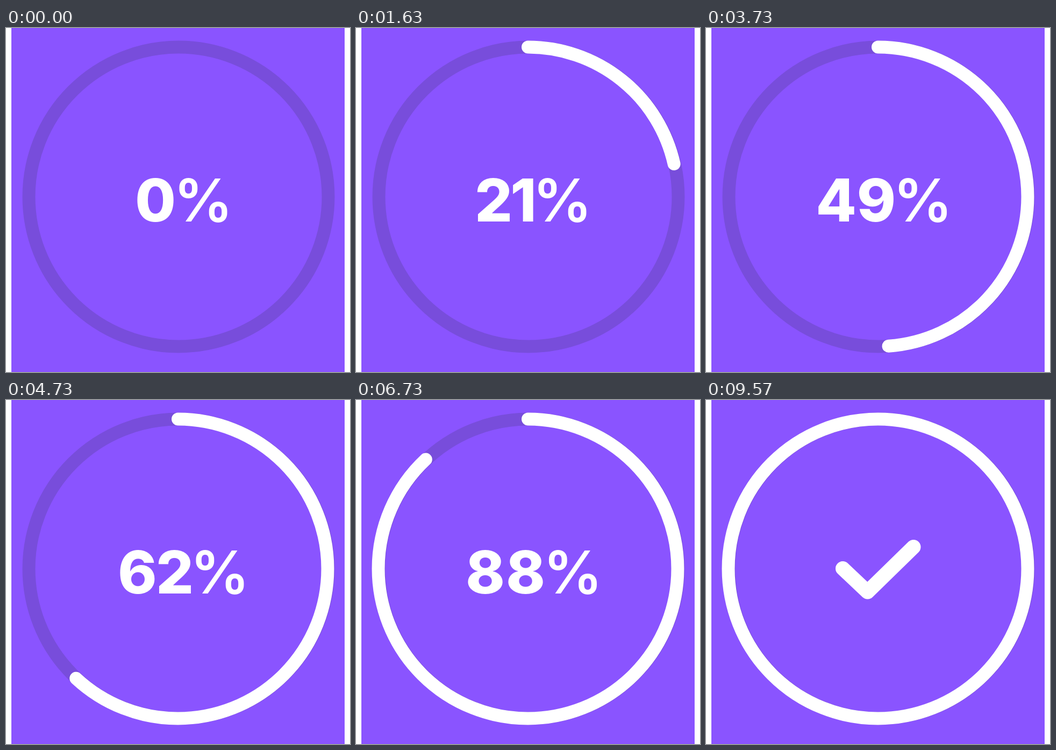
These frames come from a looping animation (640x640 px, 9610 ms). An HTML page:

```html
<!DOCTYPE html>
<html lang="en">
<head>
<meta charset="utf-8">
<title>Progress ring</title>
<style>
  html, body { margin: 0; width: 100%; height: 100%; overflow: hidden; background: #fff; }
  svg { display: block; width: 100%; height: 100%; }
  text {
    font: 800 110px Inter, "Open Sans", sans-serif;
    font-feature-settings: "cv09";
    text-anchor: middle;
    fill: #fff;
  }
  .sign { font-weight: 600; }
  .line { fill: none; stroke: #fff; stroke-linecap: round; stroke-linejoin: round; }
</style>
</head>
<body>
<svg viewBox="0 0 640 640">
  <rect x="10" width="620" height="640" fill="#8a54ff"/>
  <circle cx="321" cy="314" r="278.5" fill="none" stroke="#784ddb" stroke-width="24"/>
  <circle id="ring" class="line" cx="320" cy="314" r="278.5" stroke-width="24" transform="rotate(-90 320 314)"/>
  <g id="label">
    <text y="360"></text><text y="360"></text><text y="360"></text>
    <text y="360" class="sign">%</text>
  </g>
  <path id="check" class="line" d="M254.5 313.5L300.5 357L386 273.5" stroke-width="27"/>
</svg>
<script>
const LOOP = 9610, STEP = 40;
const LENGTH = 2 * Math.PI * 278.5;
const ADVANCE = [77, 44, 67, 67, 78, 67, 72, 70, 75, 72];
const SIGN_ADVANCE = 98, CENTER = 327;

const ring = document.getElementById('ring');
const label = document.getElementById('label');
const check = document.getElementById('check');
const slots = [...label.children];
const sign = slots.pop();

const clamp = (v, lo = 0, hi = 1) => Math.min(hi, Math.max(lo, v));
const span = (t, from, to) => clamp((t - from) / (to - from));
const smooth = u => u * u * (3 - 2 * u);
const easeOut = u => 1 - (1 - u) ** 5;
const mix = (a, b, u) => a + (b - a) * u;

// The picture advances in steps of 40 ms
function stepTime(t) {
  const start = t < 2730 ? 30 : 10;
  const q = start + STEP * Math.floor((t - start) / STEP);
  return start === 30 ? Math.min(q, 2670) : q;
}

function scale(node, s, cx, cy) {
  node.setAttribute('visibility', s > 0.002 ? 'visible' : 'hidden');
  node.setAttribute('transform', `translate(${cx} ${cy}) scale(${s}) translate(${-cx} ${-cy})`);
}

function drawNumber(value) {
  const digits = [...String(value)].map(Number);
  const width = digits.reduce((sum, d) => sum + ADVANCE[d], SIGN_ADVANCE);
  let x = CENTER - width / 2;
  slots.forEach((slot, i) => {
    const d = digits[i];
    slot.textContent = d ?? '';
    if (d === undefined) return;
    slot.setAttribute('x', x + ADVANCE[d] / 2);
    x += ADVANCE[d];
  });
  sign.setAttribute('x', x + SIGN_ADVANCE / 2 + 1.5);
}

function drawRing(percent) {
  ring.setAttribute('visibility', percent > 0 ? 'visible' : 'hidden');
  ring.setAttribute('stroke-dasharray',
    percent < 100 ? `${LENGTH * percent / 100} ${LENGTH}` : 'none');
}

function render(time) {
  const t = stepTime(time);
  const percent = t < 0 ? 0 : clamp((t + 15) / 76.65, 0, 100);
  drawRing(percent);
  drawNumber(Math.round(percent));

  const labelScale = t < 7933
    ? mix(1, 1.1, smooth(span(t, 7733, 7933)))
    : mix(1.1, 0, smooth(span(t, 7933, 8233)));
  scale(label, labelScale, 320, 320);

  const checkScale = t < 8500
    ? mix(0, 1.115, smooth(span(t, 8210, 8500)))
    : mix(1.115, 1, easeOut(span(t, 8500, 9600)));
  scale(check, checkScale, 320, 311);
}

const begin = performance.now();
function tick() {
  render((performance.now() - begin) % LOOP);
  requestAnimationFrame(tick);
}
tick();
</script>
</body>
</html>
```
